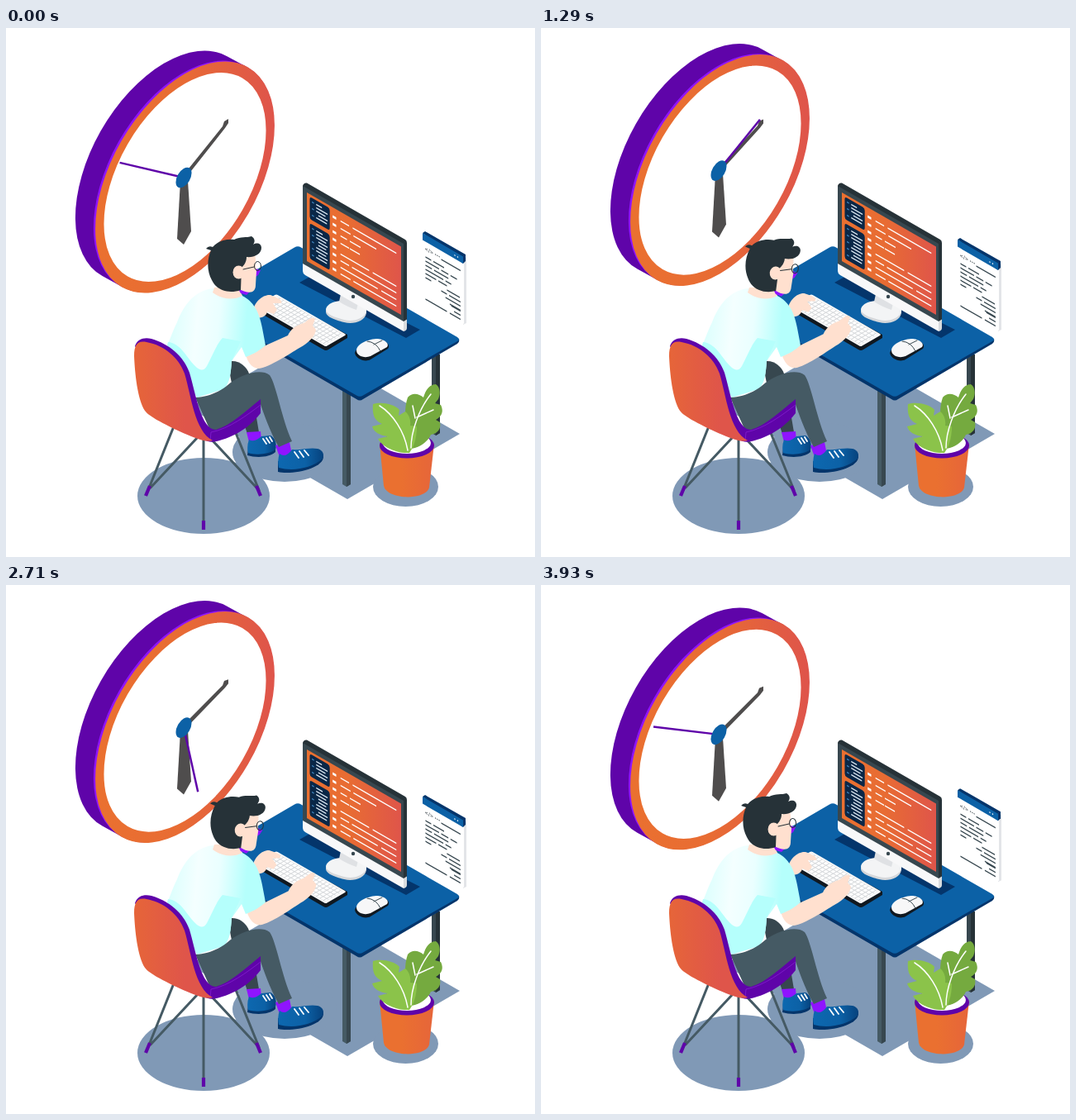
Write an HTML page that moves like this. It is 640 px wide and 640 px high and loops after 4000 ms.

```html
<!DOCTYPE html>
<html lang="en">
<head>
<meta charset="utf-8">
<title>Working hours</title>
<style>
  html, body { margin: 0; width: 100%; height: 100%; overflow: hidden; background: #fff; }
  svg { display: block; width: 100%; height: 100%; }
  .shade { fill: #8099b6; }
  .blue { fill: #0c61a6; }
  .navy { fill: #04356b; }
  .purple { fill: #5f04a9; }
  .violet { fill: #8f14ff; }
  .steel { fill: #455a64; }
  .slate { fill: #37474f; }
  .hair { fill: #263238; }
  .skin { fill: #ffe0cf; }
  .line { fill: none; stroke-linecap: round; stroke-linejoin: round; }
  .tag { font: 6px "DejaVu Sans", sans-serif; fill: #263238; }
</style>
</head>
<body>
<svg viewBox="0 0 640 640">
  <defs>
    <linearGradient id="warm">
      <stop offset="0" stop-color="#ea7030"/>
      <stop offset=".45" stop-color="#e86c33"/>
      <stop offset="1" stop-color="#df554a"/>
    </linearGradient>
    <linearGradient id="seat">
      <stop offset="0" stop-color="#e66539"/>
      <stop offset=".65" stop-color="#df554a"/>
    </linearGradient>
    <linearGradient id="clay">
      <stop offset=".4" stop-color="#ea7030"/>
      <stop offset="1" stop-color="#e6653a"/>
    </linearGradient>
    <linearGradient id="shirt" x1="0" y1=".3" x2="1" y2=".4">
      <stop offset="0" stop-color="#d9fffd"/>
      <stop offset=".3" stop-color="#f4ffff"/>
      <stop offset=".52" stop-color="#eaffff"/>
      <stop offset=".8" stop-color="#b5fffc"/>
    </linearGradient>
    <linearGradient id="shoe">
      <stop offset="0" stop-color="#0d68b0"/>
      <stop offset=".6" stop-color="#0c61a6"/>
      <stop offset="1" stop-color="#06427d"/>
    </linearGradient>
  </defs>

  <!-- floor shadows -->
  <g class="shade">
    <path d="M222 460 358 381 549 491 413 570Z"/>
    <ellipse cx="337" cy="513" rx="63" ry="36"/>
    <ellipse cx="239" cy="566" rx="80" ry="46"/>
    <ellipse cx="483.500" cy="555" rx="39.500" ry="24"/>
  </g>

  <!-- wall clock -->
  <g id="clock">
    <g transform="matrix(.866 -.5 0 1 216.500 180.500)">
      <path class="line" stroke="#5f04a9" stroke-width="249.600" d="M-28.300-27.600-.5-.5"/>
      <path class="line" stroke="#8f14ff" stroke-width="249.600" d="M-2.900-2.800-.5-.5"/>
      <circle r="119.200" fill="#fff" stroke="url(#warm)" stroke-width="12"/>
    </g>
    <path fill="#4f4d4d" d="M211 185h9l4 61-9 16-8-7Z"/>
    <g transform="translate(215 181)">
      <g id="minute" fill="#4f4d4d">
        <path d="M2-6 47-62 49-68 54-71 54-66 50-60 5-3Z"/>
      </g>
      <path id="second" stroke="#5f04a9" stroke-width="2.500" d="M0 0V-79.500"/>
      <circle class="blue" r="11" transform="matrix(.866 -.5 0 1 0 0)"/>
    </g>
  </g>

  <!-- floating page -->
  <g id="page">
    <path fill="#e3e5e8" d="M553 276 557 278V357L553 359Z"/>
    <path fill="#fff" d="M504 252 554 280V358L504 329Z"/>
    <path class="navy" d="M504 248 507 246 556 274V282L553 285Z"/>
    <path class="blue" d="M504 248 553 276.500V285L504 256.500Z"/>
    <g transform="matrix(.866 .5 0 1 504 248)">
      <g fill="#fff"><circle cx="45" cy="4.500" r=".8"/><circle cx="49" cy="4.500" r=".8"/></g>
      <text class="tag" x="3" y="19">&lt;/&gt;</text>
      <path class="line" stroke="#263238" stroke-width="1.300" d="M18 17h.1m2.500 0h.1m2.500 0h.1"/>
      <path fill="none" stroke="#37474f" stroke-width="1.500" d="M4 27h8m3 0h15M26 19h27M4 32h19m3 0h10m3 0h9M4 37h9m3 0h20M4 42h25m3 0h8M4 47h15m3 0h12M4 52h8M34 52h18M26 57h8m3 0h16M32 62h21M38 67h15M44 73h9M4 78h30m4 0h15M40 68h13"/>
    </g>
  </g>

  <!-- desk -->
  <path class="slate" d="M515 395h10v95l-5 3-5-3Z"/>
  <path class="hair" d="M520 395h5v95l-5 3Z"/>
  <path class="steel" d="M407 435h10v117l-5 3-5-3Z"/>
  <path class="slate" d="M412 435h5v117l-5 3Z"/>
  <path class="navy" d="M232 334 300 299 548 376Q549 380 546 382L432 449Q428 452 424 449L232 338Z"/>
  <path class="blue" d="M232 334 349 265.500Q353 263 357 265.500L546 374Q550 377 546 379L432 444.500Q428 447 424 444.500Z"/>
  <path class="navy" d="M355 308 371 299 501 365 484 375Z"/>

  <!-- monitor -->
  <path fill="#d5d7da" d="M387 342C389 333 403 329 418 331 430 332 437 338 436 345 434 355 420 359 409 356 397 353 386 349 387 342Z"/>
  <path fill="#f3f4f5" d="M387 340C389 333 397 331 404 330L407 320 426 330 423 334C431 335 437 339 436 343 433 352 420 356 409 353 397 350 387 346 387 340Z"/>
  <path fill="#dfe1e4" d="M405 322 426 333 424 341Q412 337 403 331Z"/>
  <path class="hair" d="M359 191Q360 187 364 187.500L483 256Q485 257 485 260V353L481 356 359 286Z"/>
  <path class="slate" d="M359 191 481 261V356L359 286Z"/>
  <path fill="#f8f8f9" d="M359 285 481 355V367L362 299Q359 297 359 294Z"/>
  <path fill="#d9dbde" d="M481 355 485 352.500V363Q485 366 481 367Z"/>
  <circle class="slate" cx="420" cy="325" r="2.200"/>
  <path fill="url(#warm)" d="M364 199 478 264.500V347L364 282Z"/>
  <g transform="matrix(.866 .5 0 1 364 199)" fill="none" stroke="#fff">
    <g fill="#0a2747" stroke="none">
      <rect x="4" y="3" width="28" height="27" rx="3"/>
      <rect x="4" y="35" width="28" height="43" rx="3"/>
    </g>
    <path stroke="#dce8f2" stroke-width="1.500" d="M13 8h8M13 12h16M13 16h13M16 20h13M13 24h15M13 40h9M13 44h16M13 48h14M16 52h13M16 56h11M13 60h16M13 64h14M16 68h13M13 72h15"/>
    <path stroke="#3f83bd" stroke-width="1.300" d="M7 8h3M7 16h3M7 24h3M7 40h3M7 48h3M7 56h3M7 64h3M7 72h3"/>
    <path stroke-width="3" d="M36 11h5M36 20h5M36 29h5M36 38h5M36 47h5M36 56h5M36 65h5M36 74h5"/>
    <path stroke-width="1.600" d="M47 11h12m5 0h61M47 20h14m4 0h32M47 29h9m4 0h15M47 38h12M60 38h14M47 51h40m5 0h33M47 59h12m4 0h62M47 67h52m5 0h21M47 75h14m4 0h60"/>
  </g>

  <!-- keyboard and mouse -->
  <path fill="#101820" d="M301 338 327 324 413 371V375L390 389Q387 391 384 389L301 341Z"/>
  <g transform="matrix(.866 .5 -.866 .5 327 322)">
    <rect width="98" height="29" rx="2" fill="#fafafa"/>
    <path fill="none" stroke="#cfd2d5" stroke-width="4.700" d="M3 4.500h92M3 9.500h92M3 14.500h92M3 19.500h92M3 24.500h92"/>
    <path fill="none" stroke="#fff" stroke-width="4" stroke-dasharray="4 1" d="M3 4.500h92M3 9.500h92M3 14.500h92M3 19.500h92M3 24.500h92"/>
  </g>
  <path fill="#101820" d="M422 393C424 386 440 378 451 377 462 379 465 384 462 388L441 401C434 405 423 400 422 393Z"/>
  <path fill="#f7f7f8" d="M424 390C424 382 439 376 450 376 459 377 464 382 461 386L441 397C434 400 424 397 424 390Z"/>
  <path class="line" stroke="#37474f" d="M437 379Q448 380 453 391M445 383 455 378"/>

  <!-- plant -->
  <path fill="url(#clay)" d="M452 503 457 554C461 571 508 572 512 556L518 503Z"/>
  <ellipse class="purple" cx="485" cy="505" rx="33" ry="15.500"/>
  <ellipse fill="#fff" cx="485" cy="502" rx="29" ry="13"/>
  <path fill="#75aa3f" d="M490 509C484 490 480 463 486 447 492 440 500 443 505 447 508 436 514 431 520 431 525 434 526 442 523 449L519 454 526 456C530 464 527 470 520 474L525 477C527 486 521 491 514 492 510 501 500 508 490 509Z"/>
  <path fill="#8bc34a" d="M488 514C474 515 456 508 450 497L462 494C452 493 445 489 443 482L455 479C445 475 443 467 444 455 454 452 470 455 476 462L475 469 483 464C488 468 490 475 489 481L497 482C497 496 494 506 488 514Z"/>
  <path class="line" stroke="#fff" stroke-width="1.500" d="M452 457C468 467 482 488 486 511M490 508C490 489 499 462 514 443M495 472 492 457M497 471 517 462"/>

  <!-- chair frame -->
  <g class="line" stroke="#455a64" stroke-width="3">
    <path d="M203 482 172 559M232 495 175 556M239 495V600M246 495 303 556M276 485 306 559"/>
    <path stroke="#5f04a9" stroke-width="4.200" stroke-linecap="butt" d="M174 554 169 566M239 596V607M303 554 308 566"/>
  </g>

  <!-- far leg -->
  <path class="slate" d="M268 404C280 400 291 409 294 418L306 489 292 491 275 440Z"/>
  <path class="violet" d="M291 489 308 488 309 499 294 501Z"/>
  <path class="navy" d="M293 508 326 507 326 513C318 520 302 520 292 517Z"/>
  <path fill="url(#shoe)" d="M294 498Q300 502 309 494L320 493C326 496 328 504 326 510 318 516 302 517 293 514Q291 506 294 498Z"/>

  <!-- arms and torso -->
  <g id="farArm" class="skin">
    <path d="M298 345C300 331 311 322 320 323 328 326 335 329 333 333L323 333 328 341 324 346 316 343C315 349 308 352 302 350Z"/>
  </g>
  <g id="nearArm" class="skin">
    <path d="M288 385C290 403 297 412 306 412 319 410 342 395 355 387 366 381 374 373 375 365L371 360 374 352C370 348 365 354 360 357 350 360 344 365 341 372L312 385 300 370Z"/>
  </g>
  <path fill="url(#shirt)" d="M251 315C226 317 213 340 207 356 201 368 199 376 195 384L231 447 263 437C271 430 272 416 273 403L285 386 290 398C301 394 308 389 314 384L310 363C306 340 297 329 284 323Z"/>
  <path fill="#b5fffc" d="M196 380C210 381 218 397 226 406 234 415 239 416 243 409 249 398 255 382 262 375L284 379 273 403C272 418 271 430 263 437L231 447 195 384Z"/>

  <!-- near leg -->
  <path class="violet" d="M326 505 343 501 346 516 331 519Z"/>
  <path class="navy" d="M329 524 384 518C385 533 346 541 329 537Z"/>
  <path fill="url(#shoe)" d="M331 515Q338 521 346 510C357 511 367 507 377 509 384 511 386 517 382 522 370 532 348 537 330 532Q328 522 331 515Z"/>
  <path class="line" stroke="#fff" stroke-width="1.800" d="M349 513 354 520M355 512 360 519M361 511 366 517M311 497 315 503M315 496 319 502M319 495 322 500"/>
  <path class="steel" d="M229 447C246 446 258 440 267 433 282 420 307 411 319 420 327 431 334 475 346 500L330 507C318 486 312 466 307 453 294 466 270 485 248 489Z"/>

  <!-- chair shell -->
  <path class="purple" d="M156 385C159 376 167 374 176 376 197 382 215 397 222 417 230 444 236 486 254 486 272 481 289 464 308 449V466C298 479 285 489 270 495 260 499 251 502 244 500 215 490 195 470 190 430Z"/>
  <path class="line" stroke="#8420d0" stroke-width=".8" d="M247 500 248 489C270 485 292 468 308 456"/>
  <path fill="url(#seat)" d="M155 397C155 382 160 378 170 380 192 384 209 399 216 418 224 444 228 488 250 499 241 502 226 495 210 488 191 479 173 470 168 463 159 449 156 418 155 397Z"/>

  <!-- head -->
  <path class="skin" d="M252 314 281 313 286 324C275 330 260 328 250 320Z"/>
  <g id="head">
    <path class="violet" d="M302 291 308 293 305 299 302 301ZM281 316 296 318 291 323 284 321Z"/>
    <path class="skin" d="M282 279 301 273C303 281 301 287 303 294L302 311C302 321 294 322 282 316Z"/>
    <path class="hair" d="M242 267Q245 263 250 265C256 258 266 255 276 256 284 252 291 254 297 252 302 255 301 259 299 262 304 259 309 261 309 266 309 274 299 278 291 277 291 283 288 287 285 290L284 317C270 322 255 318 249 305 243 294 243 280 248 269Z"/>
    <ellipse class="skin" cx="281.500" cy="295.500" rx="7" ry="8"/>
    <path class="line" stroke="#263238" d="M287 292 300 289"/>
    <ellipse class="line" stroke="#263238" cx="304.500" cy="288" rx="4" ry="5.500"/>
  </g>
</svg>

<script>
  const LOOP = 4000, FPS = 14, FRAMES = 56;
  const part = id => document.getElementById(id);
  const [clock, page, minute, second, head, nearArm, farArm] =
    ["clock", "page", "minute", "second", "head", "nearArm", "farArm"].map(part);
  const pose = (el, value) => el.setAttribute("transform", value);

  function draw(ms) {
    // the picture advances in held steps; 5 ms keeps each step on its 10 ms tick
    const p = Math.floor((ms + 5) % LOOP * FPS / 1000) / FRAMES;
    const sway = (1 - Math.cos(p * 4 * Math.PI)) / 2;
    const drop = 13 * (1 - (1 - p) ** 3);

    pose(clock, `translate(0 ${-10.4 * sway})`);
    pose(page, `translate(0 ${10 * sway})`);
    pose(second, `rotate(${-76.8 + 360 * p})`);
    pose(minute, `matrix(1 ${drop / 54} 0 1 0 0)`);
    pose(head, `rotate(${6.5 * sway} 272 320)`);
    pose(nearArm, `rotate(${-2.2 * sway} 285 350)`);
    pose(farArm, `rotate(${-4 * sway} 285 350)`);
  }

  const start = performance.now();
  function tick() {
    draw(performance.now() - start);
    requestAnimationFrame(tick);
  }
  tick();
</script>
</body>
</html>
```
